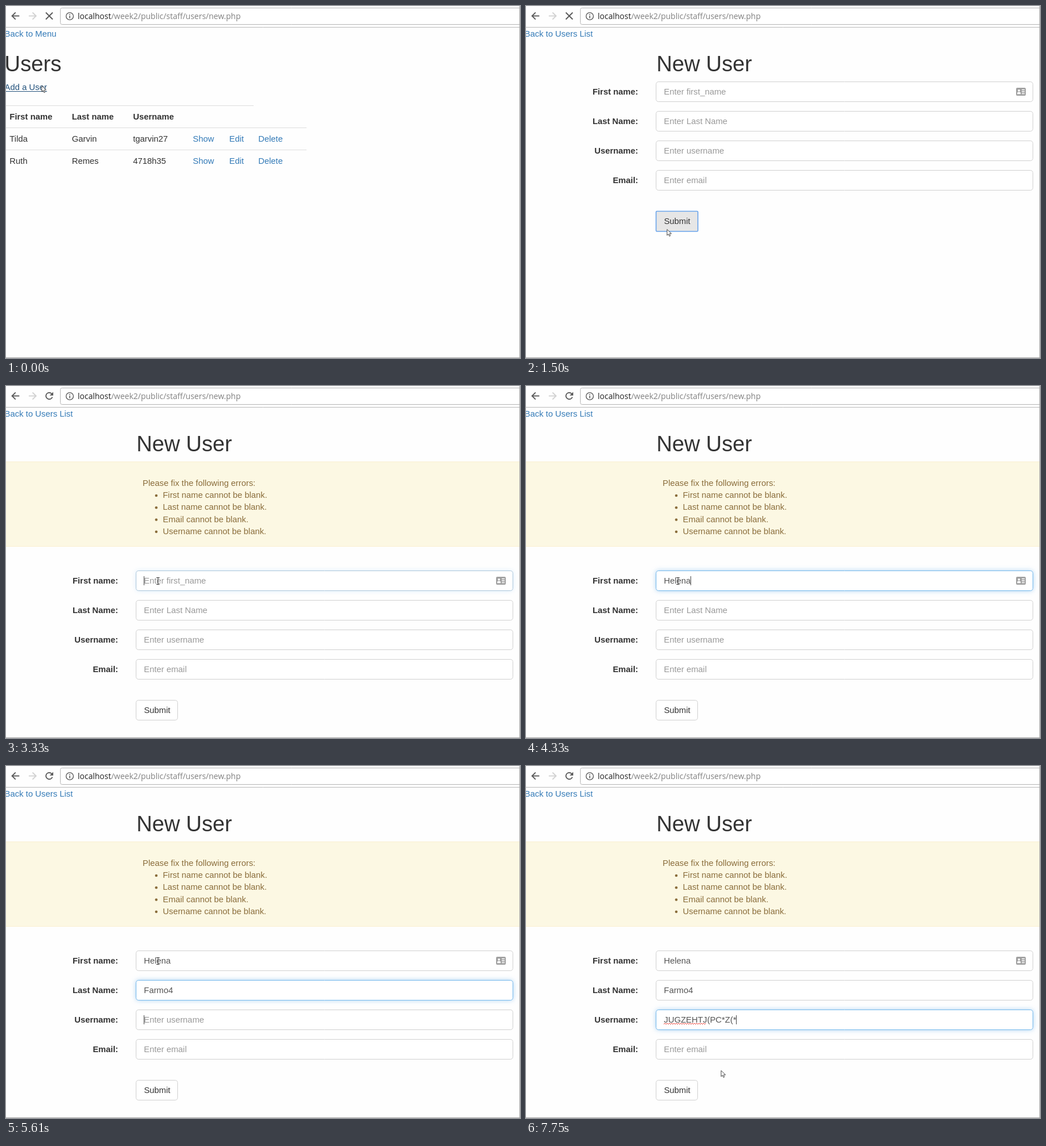
Recreate the animation shown at these times as an HTML page with a canvas. Size 903 by 620 pixels, loop 8000 ms.

```html
<!DOCTYPE html>
<html lang="en">
<head>
<meta charset="utf-8">
<title>New user form</title>
<style>
html, body { margin: 0; width: 100%; height: 100%; overflow: hidden; background: #fefefe; }
canvas { display: block; }
</style>
</head>
<body>
<canvas id="stage" width="903" height="620"></canvas>
<script>
const c = document.getElementById('stage').getContext('2d');
const LOOP = 8000, GLIDE = 60, FADE = 150;
const SANS = '"Liberation Sans", Arial, sans-serif';
const BODY = '14.875px ' + SANS;
const BOLD = 'bold ' + BODY;
const TITLE = '38.25px ' + SANS;
const LINK = '#337ab7', INK = '#333', WARN = '#8a6d3b', GREY = '#5a5a5a';

// Page events
const OPENED = 520, HOVERED = 930, SENT = 1500, FAILED = 1900, RETURNED = 2630;

const ERRORS = ['First name', 'Last name', 'Email', 'Username'];
const PEOPLE = [
  ['Tilda', 'Garvin', 'tgarvin27'],
  ['Ruth', 'Remes', '4718h35']
];
// Each field gets focus, then one key per step from its first key on.
const FIELDS = [
  { label: 'First name:', hint: 'Enter first_name', value: 'Helena', focus: 3270, first: 3570, step: 120 },
  { label: 'Last Name:', hint: 'Enter Last Name', value: 'Farmo4', focus: 4480, first: 4720, step: 152 },
  { label: 'Username:', hint: 'Enter username', value: 'JUGZEHTJ(PC*Z(*', focus: 5610, first: 6290, step: 104 },
  { label: 'Email:', hint: 'Enter email', value: '', focus: Infinity, first: Infinity, step: 1 }
];
// Arrival time, shape and place of the pointer.
const STOPS = [
  [0, 'arrow', 62.5, 140], [130, 'hand', 62, 140], [640, 'beam', 250, 203],
  [1080, 'hand', 247, 393], [SENT, 'arrow', 247.5, 393], [FAILED, 'hand', 244.5, 344.5],
  [2020, 'arrow', 259.5, 232], [RETURNED, 'beam', 267, 343.5], [6470, 'arrow', 342.5, 536]
];

const clamp = v => Math.max(0, Math.min(1, v));

function text(s, x, y, color = INK, font = BODY, align = 'left') {
  c.font = font;
  c.fillStyle = color;
  c.textAlign = align;
  c.fillText(s, x, y);
}

function line(color, width, ...p) {
  c.strokeStyle = color;
  c.lineWidth = width;
  c.beginPath();
  for (let i = 0; i < p.length; i += 2) c.lineTo(p[i], p[i + 1]);
  c.stroke();
}

function box(x, y, w, h, r, fill, stroke, width = 1) {
  c.beginPath();
  c.roundRect(x, y, w, h, r);
  if (fill) { c.fillStyle = fill; c.fill(); }
  if (stroke) { c.strokeStyle = stroke; c.lineWidth = width; c.stroke(); }
}

function rect(color, x, y, w, h) {
  c.fillStyle = color;
  c.fillRect(x, y, w, h);
}

function dot(color, x, y, r) {
  c.fillStyle = color;
  c.beginPath();
  c.arc(x, y, r, 0, 7);
  c.fill();
}

function arc(x, y, r, from, to, width) {
  c.strokeStyle = GREY;
  c.lineWidth = width;
  c.beginPath();
  c.arc(x, y, r, from, to);
  c.stroke();
}

function navArrow(x, dir, color) {
  const tip = x + 6.4 * dir;
  line(color, 1.9, x - 6.4 * dir, 17.5, tip, 17.5);
  line(color, 1.9, tip - 6.2 * dir, 11.3, tip, 17.5, tip - 6.2 * dir, 23.7);
}

function toolbar(loading) {
  navArrow(17, -1, GREY);
  navArrow(46.4, 1, '#d2d2d2');
  if (loading) {
    line(GREY, 2, 70, 11.5, 82, 23.5);
    line(GREY, 2, 82, 11.5, 70, 23.5);
  } else {
    arc(76, 17.5, 5.8, 0.35, 5.55, 1.9);
    c.fillStyle = GREY;
    c.beginPath();
    c.moveTo(83, 10.5);
    c.lineTo(83, 16.8);
    c.lineTo(76.7, 16.8);
    c.fill();
  }
  box(95.5, 3.5, 820, 29, 3, '#fff', '#b4b4b4');
  arc(112, 18, 6.4, 0, 7, 1.4);
  rect(GREY, 111.2, 17, 1.6, 4.6);
  rect(GREY, 111.2, 14.2, 1.6, 1.6);
  const font = '14px "Open Sans", "Noto Sans", sans-serif';
  text('localhost', 126, 23, '#222', font);
  text('/week2/public/staff/users/new.php', 126 + c.measureText('localhost').width, 23, '#808080', font);
  line('#b9b9b9', 1, 0, 37.5, 903, 37.5);
}

function usersPage() {
  text('Back to Menu', -2.4, 54, LINK);
  text('Users', -2.4, 115, INK, TITLE);
  text('Add a User', -2.4, 148, '#23527c');
  line('#23527c', 1, 0, 150.5, 72, 150.5);
  line('#ddd', 1, 0, 175.5, 435, 175.5);
  const cols = [6.3, 115.7, 223.2, 328.3, 392.3, 443.3];
  ['First name', 'Last name', 'Username'].forEach((s, i) => text(s, cols[i], 200, INK, BOLD));
  PEOPLE.forEach((person, r) => {
    const y = 239 + 39 * r;
    line('#ddd', 1, 0, y - 24.5, 528, y - 24.5);
    [...person, 'Show', 'Edit', 'Delete'].forEach((s, i) => text(s, cols[i], y, i < 3 ? INK : LINK));
  });
}

function warning() {
  rect('#fcf8e3', 0, 133, 902, 150);
  line('#faf0d0', 1, 0, 133.5, 902, 133.5);
  line('#faf0d0', 1, 0, 282.5, 902, 282.5);
  text('Please fix the following errors:', 240, 176, WARN);
  ERRORS.forEach((s, i) => {
    const y = 197.2 + 21.25 * i;
    dot(WARN, 264, y - 4.2, 2.3);
    text(s + ' cannot be blank.', 275.5, y, WARN);
  });
}

function cardIcon(y) {
  box(861, y - 7, 17, 14, 2, '#a0a0a0');
  dot('#fff', 866, y - 2.2, 1.9);
  box(863, y + 0.6, 6, 3.6, [2, 2, 0, 0], '#fff');
  for (let i = -1; i < 2; i++) rect('#fff', 871, y - 0.8 + 3.4 * i, 5, 1.6);
}

function squiggle(x, end, y) {
  const p = [];
  for (let i = 0; x + 2 * i <= end; i++) p.push(x + 2 * i, y + (i % 2 ? -1 : 1));
  line('#e8443a', 1, ...p);
}

function frame(y, glow) {
  c.save();
  if (glow) {
    c.shadowColor = `rgba(102,175,233,${0.6 * glow})`;
    c.shadowBlur = 8;
  }
  box(228.5, y + 0.5, 662, 35, 4.25, '#fff');
  c.restore();
  const mix = (a, b) => a + (b - a) * glow;
  box(228.5, y + 0.5, 662, 35, 4.25, null, `rgb(${mix(208, 116)},${mix(208, 184)},${mix(208, 236)})`);
}

function field(i, y, t) {
  const f = FIELDS[i];
  const next = i < 3 ? FIELDS[i + 1].focus : Infinity;
  frame(y, clamp((t - f.focus) / FADE) - clamp((t - next) / FADE));

  const count = Math.max(0, Math.floor((t - f.first) / f.step) + 1);
  const value = f.value.slice(0, count);
  text(f.label, 197, y + 23, INK, BOLD, 'right');
  text(value || f.hint, 242.3, y + 23, value ? '#555' : '#999');
  if (i === 2 && count > 8) squiggle(242, 242 + c.measureText(value.slice(0, 8)).width, y + 25);
  if (t >= f.focus && t < next) rect('#444', Math.round(242 + c.measureText(value).width), y + 10, 1, 16);
}

function submit(y, t) {
  if (t >= SENT && t < FAILED) box(228.5, y + 0.5, 73.5, 35.5, 1.5, '#e6e6e6', '#68a4ec', 1.6);
  else if (t >= HOVERED && t < SENT) box(228.5, y + 0.5, 73, 35, 4.25, '#e6e6e6', '#adadad');
  else box(228.5, y + 0.5, 73, 35, 4.25, '#fff', '#d0d0d0');
  text('Submit', 242.4, y + 23);
}

function formPage(t) {
  const failed = t >= FAILED;
  const top = failed ? 325 : 133;
  text('Back to Users List', -2.4, 54, LINK);
  text('New User', 229.2, 115, INK, TITLE);
  if (failed) warning();
  FIELDS.forEach((f, i) => field(i, top + 52 * i, t));
  if (t >= HOVERED && !failed || t >= RETURNED) cardIcon(top + 18);
  submit(top + 228, t);
}

function outline(...p) {
  c.beginPath();
  for (let i = 0; i < p.length; i += 2) c.lineTo(p[i], p[i + 1]);
  c.closePath();
  c.fillStyle = '#fff';
  c.fill();
  c.strokeStyle = INK;
  c.lineWidth = 0.9;
  c.stroke();
}

const shapes = {
  arrow() {
    outline(0.3, 0.5, 0.3, 11, 2.7, 8.8, 4.4, 12.6, 6.2, 11.7, 4.5, 8, 8, 7.9);
  },
  hand() {
    outline(-1, 1.5, 0, 0.5, 1.1, 1.5, 1.1, 5, 5.3, 5.8, 7.2, 6.8, 7.2, 10.5,
      5.8, 15, -0.6, 15, -4.2, 9.2, -4, 7.9, -2.7, 7.9, -1, 9.5);
    for (let i = 0; i < 3; i++) line(INK, 0.7, 1.3 + 2 * i, 5.5 + i / 2, 1.3 + 2 * i, 8);
  },
  beam() {
    line(INK, 1, 0, -6, 0, 6);
    for (const y of [-6, 6]) line(INK, 1, -2.8, y, 2.8, y);
  }
};

function pointer(t) {
  const i = STOPS.findLastIndex(s => s[0] <= t);
  const [, kind, x, y] = STOPS[i];
  const [time, , nx, ny] = STOPS[i + 1] || [Infinity, kind, x, y];
  const k = clamp(1 - (time - t) / GLIDE);
  const ease = k * k * (3 - 2 * k);
  c.save();
  c.translate(x + (nx - x) * ease, y + (ny - y) * ease);
  shapes[kind]();
  c.restore();
}

function draw(t) {
  rect('#fefefe', 0, 0, 903, 620);
  toolbar(t < OPENED || t >= SENT && t < FAILED);
  if (t < OPENED) usersPage();
  else formPage(t);
  rect('#a3a3a3', 902, 0, 1, 620);
  rect('#a3a3a3', 0, 619, 903, 1);
  pointer(t);
}

const start = performance.now();
function tick() {
  draw((performance.now() - start) % LOOP);
  requestAnimationFrame(tick);
}
tick();
</script>
</body>
</html>
```
